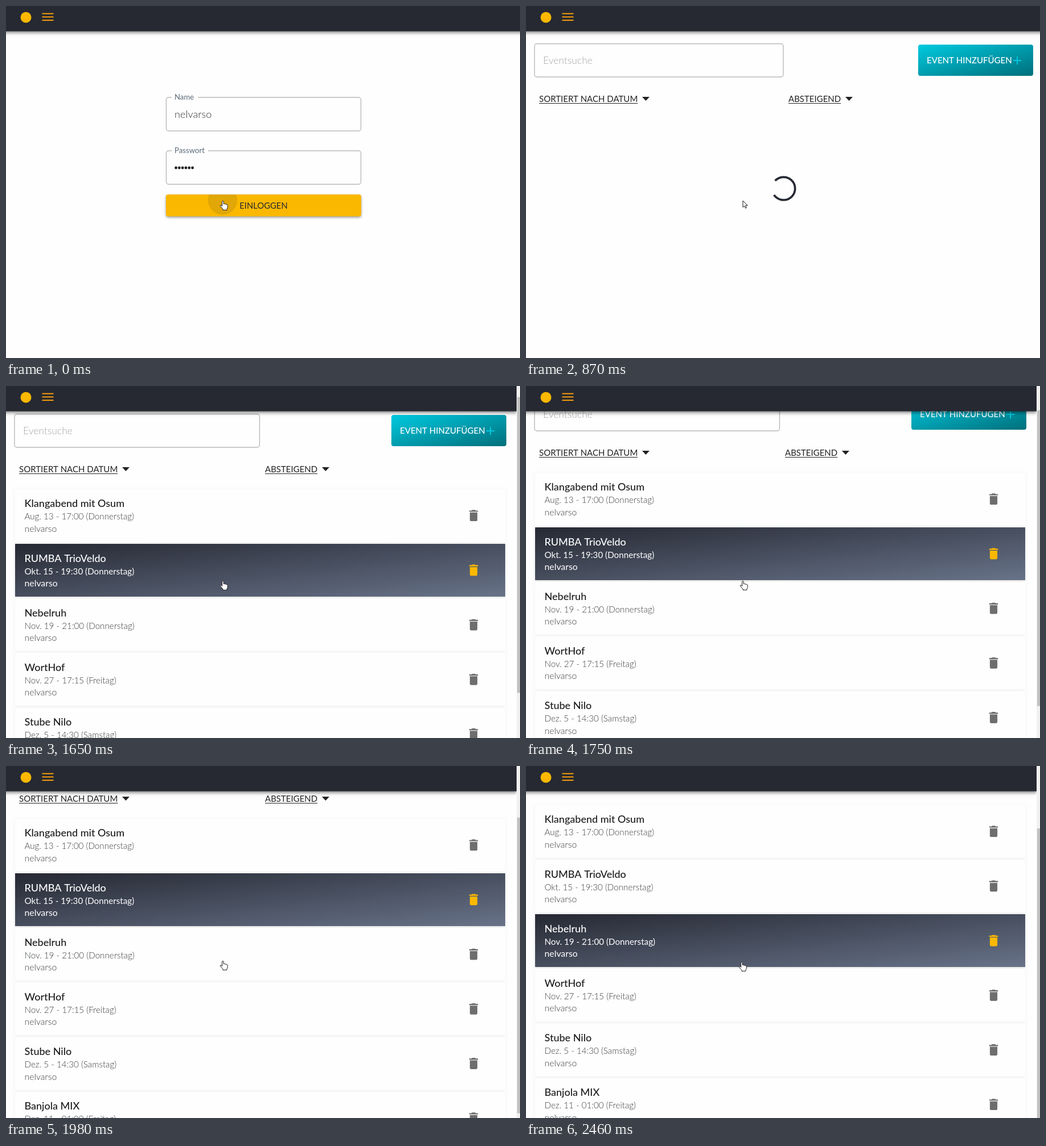
Animation, 903 px wide and 620 px high, one loop 2.93 s. Source, as an HTML page with a canvas:

```html
<!DOCTYPE html>
<html lang="de">
<head>
<meta charset="utf-8">
<title>Eventliste</title>
<style>
  html, body { margin: 0; width: 100%; height: 100%; overflow: hidden; background: #fefefe; }
  canvas { display: block; }
</style>
</head>
<body>
<canvas id="stage" width="903" height="620"></canvas>
<script>
const ctx = document.getElementById('stage').getContext('2d');
const W = 903, H = 620, LOOP = 2930;
const DARK = [38, 41, 50], INK = '#262932', AMBER = '#fbb800';

// Moments at which the screen refreshes; the picture holds in between.
const TICKS = [0, 80, 160, 240, 320, 400, 480, 550, 650, 730, 800, 870, 950, 1020, 1100, 1170,
  1240, 1330, 1400, 1470, 1540, 1610, 1680, 1750, 1830, 1910, 1980, 2060, 2140, 2220, 2290, 2380, 2460];
const PAGE_AT = 240, LIST_AT = 1240, HOVER_AT = 2060, FADE = 400;
const SPIN_START = 170, SPIN_PERIOD = 1400;
const SCROLL_START = 1480, SCROLL_END = 2060, SCROLL_MAX = 130;

const USER = 'nelvarso';
const EVENTS = [
  ['Klangabend mit Osum', 'Aug. 13 - 17:00 (Donnerstag)'],
  ['RUMBA TrioVeldo', 'Okt. 15 - 19:30 (Donnerstag)'],
  ['Nebelruh', 'Nov. 19 - 21:00 (Donnerstag)'],
  ['WortHof', 'Nov. 27 - 17:15 (Freitag)'],
  ['Stube Nilo', 'Dez. 5 - 14:30 (Samstag)'],
  ['Banjola MIX', 'Dez. 11 - 01:00 (Freitag)']
];

const BIN = new Path2D('M6 19c0 1.1.9 2 2 2h8c1.1 0 2-.9 2-2V7H6v12zM19 4h-3.5l-1-1h-5l-1 1H5v2h14V4z');
const ARROW = new Path2D('M0 0V11.5L2.7 9L4.5 13.2L6.5 12.4L4.7 8.2H8.3Z');
const HAND = new Path2D('M-1.3 1Q0-1 1.3 1V5.2Q2.6 4.4 3.7 5.6Q5 5 6 6.2Q7.6 5.8 8.3 7.6V11Q8 13 7 14.2V16H0V14.3Q-2.5 11.5-4.6 9Q-4.8 7.2-3.2 7.5L-1.3 9.2Z');

const clamp = x => Math.min(1, Math.max(0, x));
const mix = (a, b, p) => a + (b - a) * p;
const mixColor = (a, b, p) => `rgb(${a.map((v, i) => Math.round(mix(v, b[i], p)))})`;

function bezier(x1, y1, x2, y2) {
  const at = (a, b, s) => 3 * (1 - s) * (1 - s) * s * a + 3 * (1 - s) * s * s * b + s * s * s;
  return x => {
    let lo = 0, hi = 1;
    for (let i = 0; i < 24; i++) {
      const mid = (lo + hi) / 2;
      if (at(x1, x2, mid) < x) lo = mid; else hi = mid;
    }
    return at(y1, y2, lo);
  };
}
const ease = bezier(.25, .1, .25, 1);
const easeInOut = bezier(.42, 0, .58, 1);
const standard = bezier(.4, 0, .2, 1);

function text(str, x, y, size, color, weight = 400, align = 'left') {
  ctx.font = `${weight} ${size}px Lato, sans-serif`;
  ctx.textAlign = align;
  ctx.fillStyle = color;
  ctx.fillText(str, x, y);
}

function box(x, y, w, h, r) {
  ctx.beginPath();
  ctx.roundRect(x, y, w, h, r);
}

function rect(x, y, w, h, color) {
  ctx.fillStyle = color;
  ctx.fillRect(x, y, w, h);
}

function shadowed(blur, dy, color, draw) {
  ctx.save();
  ctx.shadowBlur = blur;
  ctx.shadowOffsetY = dy;
  ctx.shadowColor = color;
  draw();
  ctx.restore();
}

// Linear gradient whose middle colour runs through the other two corners.
function cornerGradient(x, y, w, h, from, to) {
  const k = w * h / (w * w + h * h), cx = x + w / 2, cy = y + h / 2;
  const g = ctx.createLinearGradient(cx - h * k, cy - w * k, cx + h * k, cy + w * k);
  g.addColorStop(0, from);
  g.addColorStop(1, to);
  return g;
}

function outline(x, y, w, h) {
  box(x, y, w, h, 4);
  ctx.strokeStyle = '#b9b9b9';
  ctx.lineWidth = 1.4;
  ctx.stroke();
}

function loginField(label, y, notchWidth) {
  outline(281.5, y, 342, 59);
  rect(291, y - 2, notchWidth, 4, '#fefefe');
  text(label, 296, y + 4, 13.2, '#596a78');
}

function drawLogin(t) {
  loginField('Name', 161, 46);
  text(USER, 296, 197, 18.2, '#333', 300);
  loginField('Passwort', 255, 64);
  ctx.fillStyle = '#1b1b1f';
  for (let i = 0; i < 6; i++) {
    ctx.beginPath();
    ctx.arc(298.6 + i * 5.8, 285, 2.4, 0, 7);
    ctx.fill();
  }
  box(281, 332, 343, 38.5, 4);
  ctx.fillStyle = AMBER;
  shadowed(4, 2, 'rgba(0,0,0,.4)', () => ctx.fill());

  const grow = standard(clamp((t + 100) / 550));
  ctx.save();
  ctx.clip();
  ctx.beginPath();
  ctx.arc(380.5, 342, 244 * grow, 0, 7);
  ctx.fillStyle = `rgba(${DARK},${mix(.1, .3, grow)})`;
  ctx.fill();
  ctx.restore();
  text('EINLOGGEN', 452.5, 356.5, 14.8, INK, 400, 'center');
}

function sortLink(label, x, y, width) {
  text(label, x, y, 15, '#222');
  rect(x, y + 2, ctx.measureText(label).width, 1, '#222');
  const left = x + width + 10;
  ctx.beginPath();
  ctx.moveTo(left, y - 9);
  ctx.lineTo(left + 13, y - 9);
  ctx.lineTo(left + 6.5, y - 2);
  ctx.fill();
}

function drawToolbar(hasBar, scroll) {
  const y = -scroll, right = hasBar ? 879 : 891;
  outline(15, 66.5 + y, hasBar ? 430.5 : 437, 58.5);
  text('Eventsuche', 30, 102 + y, 17.5, '#a6a6a6', 300);

  const left = right - 202;
  box(left, 68 + y, 202, 55, 4);
  ctx.fillStyle = cornerGradient(left, 68 + y, 202, 55, '#00cae0', '#006f7b');
  ctx.fill();
  text('EVENT HINZUFÜGEN', left + 15, 101 + y, 15, '#fff', 500);
  rect(left + 167, 95 + y, 14, 2, '#00c8de');
  rect(left + 173, 89 + y, 2, 14, '#00c8de');

  sortLink('SORTIERT NACH DATUM', 23, 169 + y, 171);
  sortLink('ABSTEIGEND', hasBar ? 455 : 461, 169 + y, 90);
}

function drawSpinner(t) {
  const p = (t - SPIN_START) / SPIN_PERIOD % 1, r = 20.2;
  const first = p < .5, e = easeInOut(first ? p * 2 : p * 2 - 1);
  const from = first ? 15 * e : mix(15, 125, e);
  const length = first ? mix(1, 100, e) : 100;
  const to = Math.min(from + length, 2 * Math.PI * r);
  const turn = p * 2 * Math.PI;
  ctx.beginPath();
  ctx.arc(452.5, 321.5, r, turn + from / r, turn + to / r);
  ctx.strokeStyle = INK;
  ctx.lineWidth = 3.7;
  ctx.stroke();
}

// 0 is the resting dark text, 1 the white text of a hovered row.
function rowLight(i, t) {
  if (i === 1) {
    return t < HOVER_AT ? ease(clamp((t - LIST_AT) / FADE)) : 1 - ease(clamp((t - HOVER_AT) / FADE));
  }
  return i === 2 ? ease(clamp((t - HOVER_AT) / FADE)) : 0;
}

function drawRow([title, date], i, t, scroll) {
  const top = 198.8 + i * 96.2 - scroll;
  const hovered = i === (t < HOVER_AT ? 1 : 2);
  const light = rowLight(i, t), white = [255, 255, 255];
  const strong = mixColor([28, 28, 31], white, light);
  const soft = mixColor([58, 60, 64], white, light);

  ctx.fillStyle = hovered ? cornerGradient(16, top, 861, 93, '#262933', '#687389') : '#fefefe';
  shadowed(5, 1, hovered ? 'rgba(0,0,0,.12)' : 'rgba(0,0,0,.05)', () => ctx.fillRect(16, Math.round(top), 861, 93));
  text(title, 32.5, top + 31.5, 18, strong, 500);
  text(date, 32.5, top + 53.5, 15.2, soft, light > .5 ? 400 : 300);
  text(USER, 32.5, top + 75, 15.8, soft, light > .5 ? 400 : 300);

  ctx.save();
  ctx.translate(808.3, top + 33.2);
  ctx.scale(1.1, 1.1);
  ctx.fillStyle = hovered ? AMBER : '#6e6e6e';
  ctx.fill(BIN);
  ctx.restore();
}

function drawHeader(width) {
  ctx.fillStyle = INK;
  shadowed(6, 2, 'rgba(0,0,0,.5)', () => ctx.fillRect(-10, -10, width + 10, 54.5));
  ctx.beginPath();
  ctx.arc(35, 20, 9.5, 0, 7);
  ctx.fillStyle = AMBER;
  ctx.fill();
  for (let i = 0; i < 3; i++) rect(63.5, 12.5 + i * 5.8, 20, 2, '#f99d0a');
}

function drawCursor(shape, x, y) {
  ctx.save();
  ctx.translate(x, y);
  ctx.fillStyle = '#fff';
  ctx.strokeStyle = '#1c1c1c';
  ctx.lineWidth = 1;
  ctx.lineJoin = 'round';
  ctx.fill(shape);
  ctx.stroke(shape);
  ctx.restore();
}

function render(t) {
  const listed = t >= LIST_AT;
  const scroll = Math.round(SCROLL_MAX * clamp((t - SCROLL_START) / (SCROLL_END - SCROLL_START)) ** 1.37);
  rect(0, 0, W, H, '#fefefe');

  if (t < PAGE_AT) {
    drawLogin(t);
  } else {
    drawToolbar(listed, scroll);
    if (listed) EVENTS.forEach((event, i) => drawRow(event, i, t, scroll));
    else drawSpinner(t);
  }

  drawHeader(listed ? 897 : W + 10);
  if (listed) {
    rect(897, 0, 6, H, '#f1f1f1');
    rect(898, 6 + scroll * .8, 5, 521, '#c1c1c1');
  }

  const drift = clamp((t - 2060) / 160) * 2;
  if (t >= PAGE_AT && !listed) drawCursor(ARROW, 381, 343);
  else drawCursor(HAND, 381 - drift, 343.3 + drift);
}

function frame(now) {
  const t = now % LOOP;
  render(TICKS.findLast(tick => tick <= t));
  requestAnimationFrame(frame);
}
requestAnimationFrame(frame);
</script>
</body>
</html>
```
